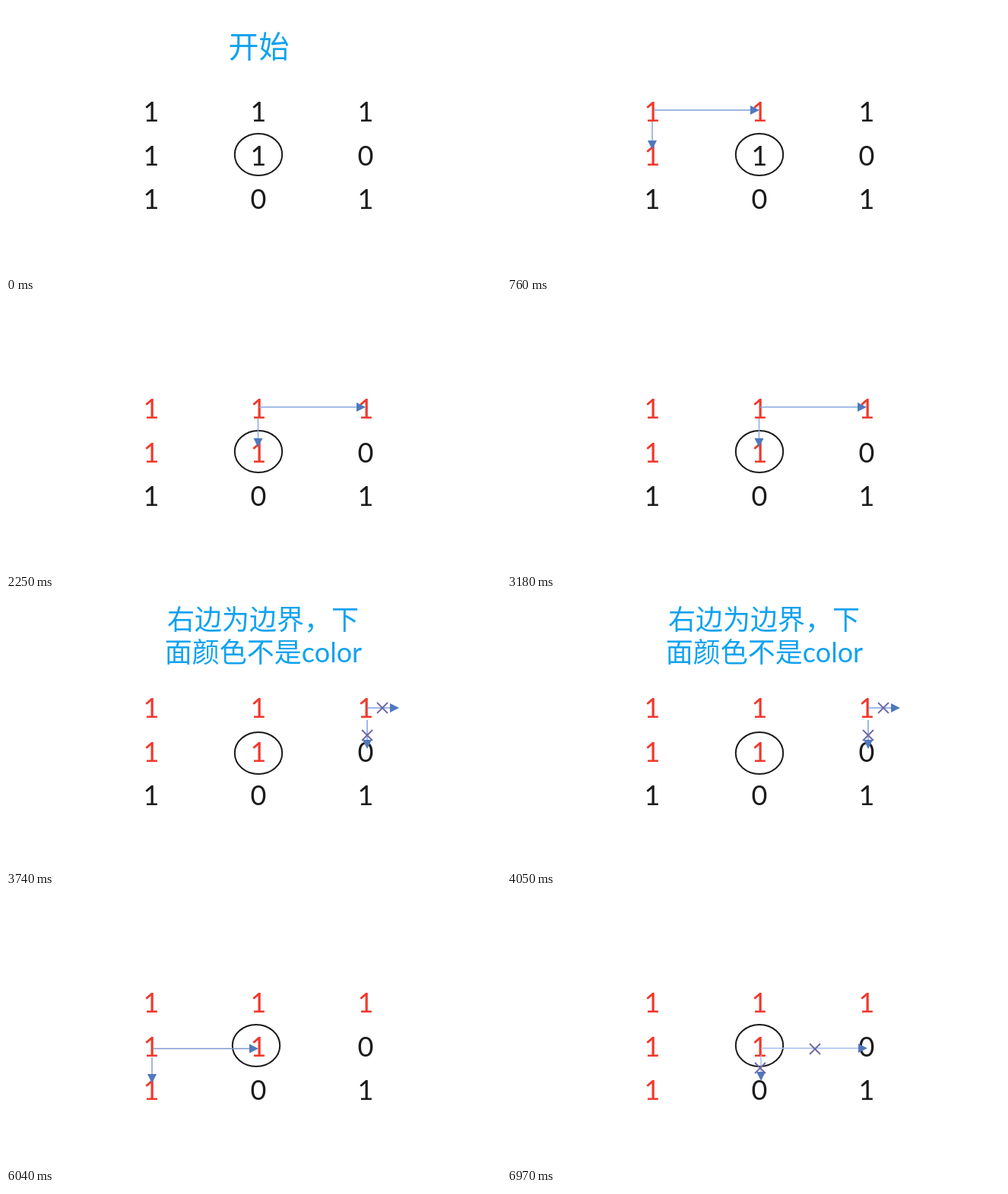
Animation of 651x354 px, one loop 8000 ms. Source, as an HTML page with a canvas:

```html
<!DOCTYPE html>
<html lang="zh-CN">
<head>
<meta charset="utf-8">
<style>
  html, body { margin: 0; width: 100%; height: 100%; overflow: hidden; background: #fff; }
  canvas { display: block; }
</style>
</head>
<body>
<canvas id="stage" width="651" height="354"></canvas>
<script>
const ctx = document.getElementById('stage').getContext('2d');
const LOOP = 8000;
const RED = '#f0392d', INK = '#1c1a1c', TITLE = '#10a2f0', HEAD = '#5078bd', CROSS = '#6c67a6';
const GRID = ['111', '110', '101'];
const COLS = [191, 332, 473], ROWS = [151.5, 209.5, 267];

// filled: red cells per row, counted from the left
const slides = [
  { start: 0, filled: [0, 0, 0], title: [['开始', 332.5, 68]], size: 40 },
  { start: 760, filled: [2, 1, 0], line: '#7c9fd8',
    arrows: [[193, 137, 332, 137], [191, 152, 191, 189]] },
  { start: 2250, filled: [3, 2, 0], line: '#86a9e0',
    arrows: [[333, 137, 473, 137], [331.5, 152, 331.5, 190]] },
  { start: 3740, filled: [3, 2, 0], line: '#6f9ade', dy: 3, ring: [332, 201.5],
    title: [['右边为边界，下', 338, 39], ['面颜色不是color', 338.5, 82]], size: 36,
    arrows: [[475, 142, 517, 142], [475, 158, 475, 196]],
    crosses: [[495, 142], [475, 178]] },
  { start: 5230, filled: [3, 2, 1], line: '#7d98cb', ring: [329, 195.5],
    arrows: [[193, 199.5, 332, 199.5], [192, 211, 192, 245]] },
  { start: 6720, filled: [3, 2, 1], line: '#a4bcf0',
    arrows: [[334, 199, 474, 199], [334, 208, 334, 242]],
    crosses: [[405, 200], [333, 225]] }
];

function text(str, x, y, color, font) {
  ctx.font = font;
  ctx.fillStyle = color;
  ctx.fillText(str, x, y);
}

function path(points, color, width) {
  ctx.beginPath();
  points.forEach(([x, y], i) => i ? ctx.lineTo(x, y) : ctx.moveTo(x, y));
  ctx.strokeStyle = color;
  ctx.lineWidth = width;
  ctx.stroke();
}

function arrow([x1, y1, x2, y2], color) {
  const length = Math.hypot(x2 - x1, y2 - y1);
  ctx.save();
  ctx.translate(x1, y1);
  ctx.rotate(Math.atan2(y2 - y1, x2 - x1));
  path([[0, 0], [length - 11, 0]], color, 1.4);
  ctx.beginPath();
  ctx.moveTo(length, 0);
  ctx.lineTo(length - 12, -6);
  ctx.lineTo(length - 12, 6);
  ctx.fillStyle = HEAD;
  ctx.fill();
  ctx.restore();
}

function cross([x, y]) {
  path([[x - 7, y - 7], [x + 7, y + 7]], CROSS, 1.8);
  path([[x - 7, y + 7], [x + 7, y - 7]], CROSS, 1.8);
}

function draw({ filled, line, dy = 0, ring = [332, 195.5], title = [], size, arrows = [], crosses = [] }) {
  ctx.fillStyle = '#fff';
  ctx.fillRect(0, 0, 651, 354);
  ctx.textAlign = 'center';
  for (const [str, x, y] of title) {
    text(str, x, y, TITLE, `${size}px Lato, "Noto Sans CJK SC", "Noto Sans CJK", sans-serif`);
  }
  ROWS.forEach((y, r) => COLS.forEach((x, c) =>
    text(GRID[r][c], x, y + dy, c < filled[r] ? RED : INK, '36px Lato, sans-serif')));
  ctx.beginPath();
  ctx.ellipse(ring[0], ring[1], 31.2, 27.6, 0, 0, Math.PI * 2);
  ctx.strokeStyle = INK;
  ctx.lineWidth = 2;
  ctx.stroke();
  arrows.forEach(a => arrow(a, line));
  crosses.forEach(cross);
}

function tick() {
  const time = performance.now() % LOOP;
  draw(slides.findLast(s => s.start <= time));
  requestAnimationFrame(tick);
}
tick();
</script>
</body>
</html>
```
